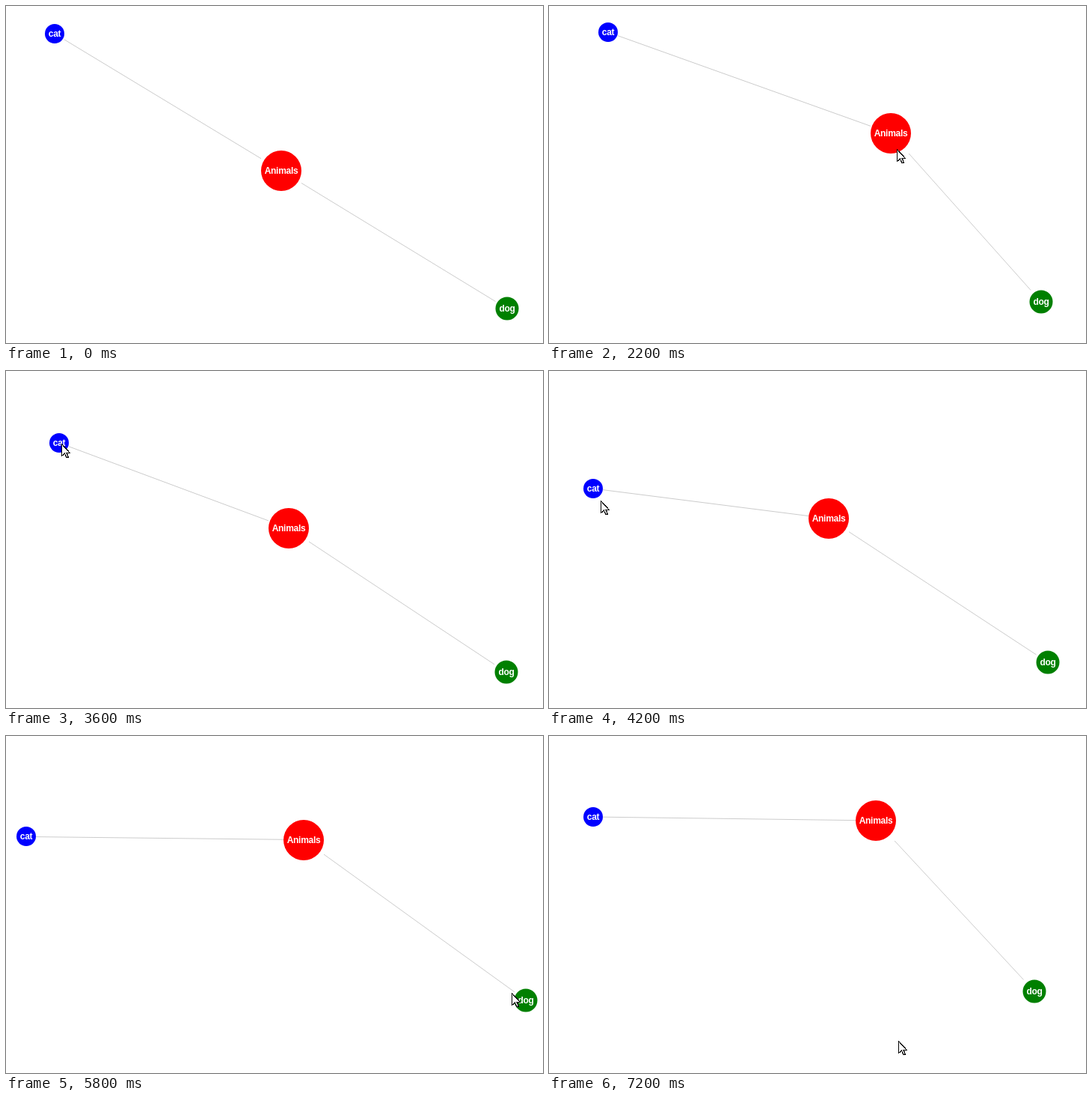
Write an HTML page that moves like this. It is 718x450 px and loops after 7.4 s.

```html
<!DOCTYPE html>
<html lang="en">
<head>
<meta charset="utf-8">
<title>Animals graph</title>
<style>
html, body { margin: 0; width: 100%; height: 100%; overflow: hidden; background: #fff; }
svg { display: block; width: 718px; height: 450px; }
text { font: bold 12px "Liberation Sans", Arial, sans-serif; letter-spacing: -.3px; fill: #fff; text-anchor: middle; }
line { stroke: #ccc; }
#pointer { fill: #fff; stroke: #000; stroke-width: 1.2; shape-rendering: crispEdges; }
</style>
</head>
<body>
<svg viewBox="0 0 718 450">
  <line id="catLink"/>
  <line id="dogLink"/>
  <g id="cat"><circle r="13" fill="#00f"/><text y="4">cat</text></g>
  <g id="animals"><circle r="27" fill="#f00"/><text y="4">Animals</text></g>
  <g id="dog"><circle r="15.5" fill="green"/><text y="4">dog</text></g>
  <path id="pointer" d="M.5 .5V16.5L4.5 13L7 18.5H9V17L7 12.5H11.5Z"/>
</svg>
<script>
const LOOP = 7400, STEP = 200;
const radius = { cat: 13, animals: 27, dog: 15.5 };
const $ = id => document.getElementById(id);

// Key poses; swell is how far the leaves are pushed out on the way to the pose
const poses = [
  { at: 400, cat: [65, 37], animals: [368, 220], dog: [670, 404], pointer: [376, 241] },
  { at: 2200, cat: [79, 35], animals: [457, 170], dog: [658, 395], pointer: [465, 191], swell: 0 },
  { at: 3000, cat: [83, 35], animals: [382, 223], dog: [670, 415], pointer: [78, 21], swell: .1 },
  { at: 4200, cat: [59, 157], animals: [374, 197], dog: [667, 389], pointer: [69, 173], swell: 0 },
  { at: 5000, cat: [61, 145], animals: [374, 146], dog: [681, 329], pointer: [685, 333], swell: .04 },
  { at: 6400, cat: [43, 127], animals: [416, 133], dog: [673, 347], pointer: [669, 351], swell: .07 },
  { at: 7200, cat: [59, 108], animals: [437, 113], dog: [649, 341], pointer: [467, 407], swell: .03 }
];

const mix = (p, q, u) => p.map((v, i) => v + (q[i] - v) * u);

function place(id, p) {
  $(id).setAttribute("transform", `translate(${p.map(Math.round).join(" ")})`);
}

// Point where the line from p to q leaves the square around p
function edge(p, q, half) {
  const reach = Math.max(...p.map((v, i) => Math.abs(q[i] - v)));
  return mix(p, q, half / reach);
}

function link(leaf, p, hub) {
  const [x1, y1] = edge(hub, p, radius.animals);
  const [x2, y2] = edge(p, hub, radius[leaf]);
  for (const [name, v] of Object.entries({ x1, y1, x2, y2 })) {
    $(leaf + "Link").setAttribute(name, v);
  }
}

function draw(t) {
  const i = Math.max(1, poses.findIndex(p => p.at >= t));
  const a = poses[i - 1], b = poses[i];
  const u = Math.max(0, (t - a.at) / (b.at - a.at));
  const spread = 1 + b.swell * Math.sin(Math.PI * u);

  const hub = mix(a.animals, b.animals, u);
  place("animals", hub);
  for (const leaf of ["cat", "dog"]) {
    const p = mix(hub, mix(a[leaf], b[leaf], u), spread);
    place(leaf, p);
    link(leaf, p, hub);
  }

  place("pointer", mix(a.pointer, b.pointer, u));
  const away = t < 200 || (t >= 4600 && t < 5400);
  $("pointer").style.display = away ? "none" : "";
}

const start = performance.now();
function tick() {
  const t = (performance.now() - start) % LOOP;
  draw(Math.floor(t / STEP) * STEP);
  requestAnimationFrame(tick);
}
tick();
</script>
</body>
</html>
```
